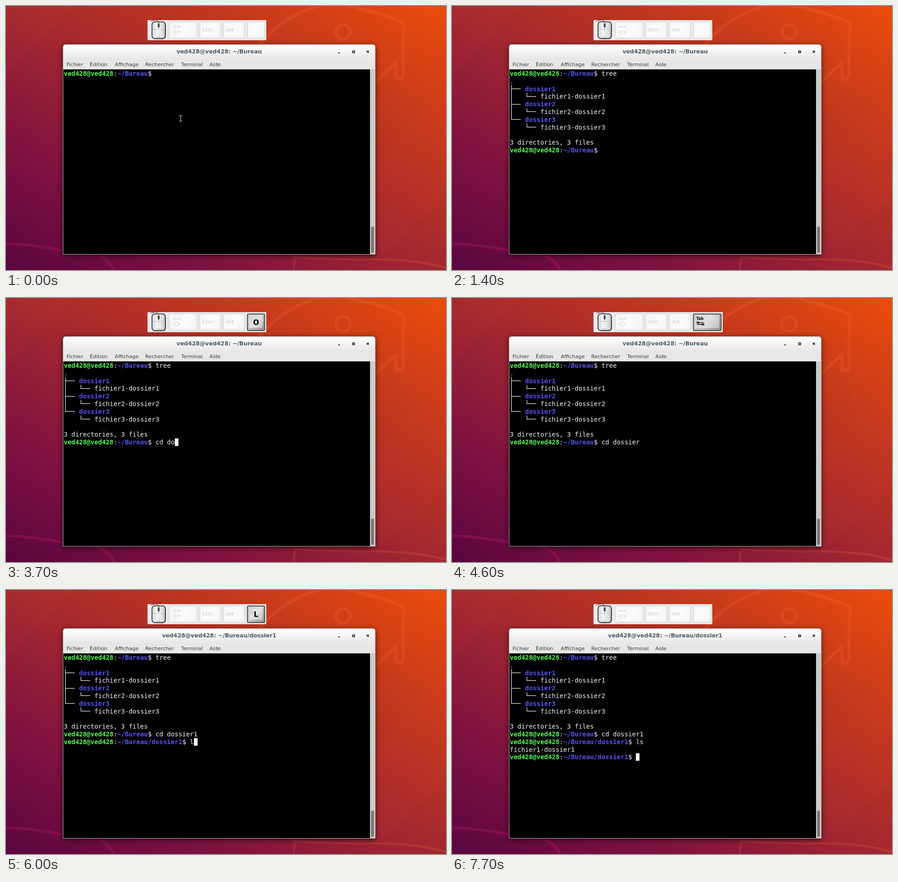
These frames come from a looping animation (967x579 px, 8 s). An HTML page with a canvas:

```html
<!DOCTYPE html>
<html lang="fr">
<head>
<meta charset="utf-8">
<title>Terminal</title>
<style>
html, body { margin: 0; width: 100%; height: 100%; overflow: hidden; background: #a4282f; }
canvas { display: block; }
</style>
</head>
<body>
<canvas id="stage" width="967" height="579"></canvas>
<script>
const ctx = document.getElementById('stage').getContext('2d');
const LOOP = 8000;
const SANS = '"DejaVu Sans", sans-serif';
const MONO = '13.95px "DejaVu Sans Mono", monospace';
const CELL = 8.4, ROW = 16.8, LEFT = 127, TOP = 140;
const WHITE = '#f6f6f6', GREEN = '#55fb55', BLUE = '#5454f2';
const USER = 'ved428@ved428';
const HOME = '~/Bureau', SUB = HOME + '/dossier1';
const DIRS = [HOME, HOME, SUB, SUB];
const DONE = ['tree', 'cd dossier1', 'ls'];

// start time, finished commands, typed text, caret visible, key shown
const STEPS = [
  [0, 0, '', 0, ''], [200, 0, 't', 1, 'T'], [300, 0, 'tr', 1, 'R'], [400, 0, 'tree', 1, 'E'],
  [800, 1, '', 1, 'E'], [900, 1, '', 1, 'Enter'], [1400, 1, '', 0, ''], [2000, 1, '', 1, ''],
  [2200, 1, 'c', 1, 'C'], [2300, 1, 'cd', 1, 'D'], [3100, 1, 'cd ', 1, 'Space'],
  [3300, 1, 'cd ', 0, ''], [3500, 1, 'cd d', 1, ''], [3600, 1, 'cd d', 1, 'D'],
  [3700, 1, 'cd do', 1, 'O'], [4000, 1, 'cd dossier', 1, 'O'], [4100, 1, 'cd dossier', 1, 'Tab'],
  [4600, 1, 'cd dossier', 0, 'Tab'], [4700, 1, 'cd dossier', 0, ''], [4800, 1, 'cd dossier1', 1, '1'],
  [5100, 2, '', 1, 'Enter'], [5600, 2, '', 1, ''], [5700, 2, '', 0, ''],
  [6000, 2, 'l', 1, 'L'], [6200, 2, 'ls', 1, 'S'], [6500, 3, '', 1, 'Enter'],
  [7100, 3, '', 0, ''], [7700, 3, '', 1, '']
];

function rect(x, y, w, h, fill) {
  ctx.fillStyle = fill;
  ctx.fillRect(x, y, w, h);
}

function box(x, y, w, h, r, fill, stroke, width = 1) {
  ctx.beginPath();
  ctx.roundRect(x, y, w, h, r);
  if (fill) { ctx.fillStyle = fill; ctx.fill(); }
  if (stroke) { ctx.strokeStyle = stroke; ctx.lineWidth = width; ctx.stroke(); }
}

function path(d, stroke, width) {
  ctx.strokeStyle = stroke;
  ctx.lineWidth = width;
  ctx.stroke(new Path2D(d));
}

function label(text, x, y, font, fill, align = 'left') {
  ctx.font = font;
  ctx.fillStyle = fill;
  ctx.textAlign = align;
  ctx.fillText(text, x, y);
}

function gradient(x0, y0, x1, y1, ...colors) {
  const g = ctx.createLinearGradient(x0, y0, x1, y1);
  colors.forEach((c, i) => g.addColorStop(i / (colors.length - 1), c));
  return g;
}

function wallpaper() {
  rect(0, 0, 967, 579, gradient(228.3, 715.7, 738.7, -136.7,
    '#5a0540', '#801240', '#a4282f', '#c5391c', '#ea4c0a'));
  ctx.fillStyle = 'rgba(255,90,60,0.035)';
  ctx.fill(new Path2D('M0 0H150L0 150Z'));
  ctx.fill(new Path2D('M967 180V420L812 560V330Z'));
  const faint = 'rgba(255,125,70,0.16)';
  path('M556 84C590 45 640 5 715 -6M740 -4C790 10 840 18 876 39C870 80 874 120 873 156L858 160L856 125L812 166', faint, 7);
  ctx.beginPath();
  ctx.arc(741, 57, 16, 0, Math.PI * 2);
  ctx.stroke();
  path('M790 0C860 30 903 85 903 145C903 205 870 260 812 306M812 150L902 110M812 80L900 170M835 84L890 220', 'rgba(255,125,70,0.13)', 1);
  path('M0 521C45 523 90 529 126 536M190 543Q225 552 237 579', 'rgba(200,20,110,0.3)', 6);
  path('M632 579L635 552L770 556Q890 552 967 574', faint, 5);
}

function frame(title) {
  ctx.save();
  ctx.shadowColor = 'rgba(0,0,0,0.6)';
  ctx.shadowBlur = 14;
  ctx.shadowOffsetY = 3;
  box(125, 84, 687, 461, [6, 6, 0, 0], '#b5b5b2');
  ctx.restore();
  box(126, 85, 685, 54, [5, 5, 0, 0], gradient(0, 85, 0, 117, '#ffffff', '#f2f2f1', '#e7e7e5'));
  label(title, 468.5, 104, 'bold 12.3px ' + SANS, '#4b5d65', 'center');
  rect(730, 102, 4, 2, '#30383c');
  box(762, 98.5, 4, 4, 0, null, '#30383c', 2);
  path('M793 98L797.5 102.5M797.5 98L793 102.5', '#30383c', 1.8);
  const menu = [['Fichier', 133], ['Édition', 184], ['Affichage', 239],
    ['Rechercher', 306], ['Terminal', 385], ['Aide', 447]];
  for (const [text, x] of menu) label(text, x, 131.5, '11.2px ' + SANS, '#3a3a3a');
  rect(126, 139, 674, 405, '#000');
  rect(800, 139, 11, 405, '#cbcbc9');
  box(803, 484, 5, 57, 2.5, '#777775', '#696967', 0.8);
}

function write(row, col, text, color, bold) {
  label(text, LEFT + col * CELL, TOP + row * ROW + 13, (bold ? 'bold ' : '') + MONO, color);
}

function prompt(row, dir, command) {
  const end = USER.length + 1 + dir.length;
  write(row, 0, USER, GREEN, true);
  write(row, USER.length, ':', WHITE);
  write(row, USER.length + 1, dir, BLUE, true);
  write(row, end, '$ ' + command, WHITE);
  return end + 2 + command.length;
}

// branch from a cell: stem down to `last` row, one arm per entry
function arm(row, col) {
  rect(Math.round(LEFT + (col + 0.5) * CELL) - 1, Math.round(TOP + (row + 0.5) * ROW) - 1, 2.5 * CELL, 1.2, WHITE);
}

function stem(row, last, col) {
  const y = TOP + row * ROW;
  rect(Math.round(LEFT + (col + 0.5) * CELL) - 1, y, 1.2, (last - row + 0.5) * ROW, WHITE);
}

function tree(row) {
  write(row, 0, '.', BLUE, true);
  stem(row + 1, row + 5, 0);
  for (let i = 1; i <= 3; i++) {
    const r = row + i * 2 - 1;
    arm(r, 0);
    write(r, 4, 'dossier' + i, BLUE, true);
    stem(r + 1, r + 1, 4);
    arm(r + 1, 4);
    write(r + 1, 8, `fichier${i}-dossier${i}`, WHITE);
  }
  write(row + 8, 0, '3 directories, 3 files', WHITE);
  return 9;
}

function shell(done, typed, caret) {
  let row = 0;
  for (let i = 0; i < done; i++) {
    prompt(row++, DIRS[i], DONE[i]);
    if (i === 0) row += tree(row);
    if (i === 2) write(row++, 0, 'fichier1-dossier1', WHITE);
  }
  const col = prompt(row, DIRS[done], typed);
  if (caret) rect(Math.round(LEFT + col * CELL), Math.round(TOP + row * ROW), 8, 16.5, '#fff');
}

function idleKey(x, w) {
  box(x + 0.5, 34.5, w - 1, 37, 2, '#f0f0f0', '#d0d0d0');
  box(x + 3, 36, w - 7, 31, 2, gradient(x, 36, x + w, 67, '#f6f6f6', '#fbfbfb', '#f4f4f4'));
}

function activeKey(name) {
  const long = name.length > 1, w = long ? 62 : 39;
  box(530.5, 35, w - 1, 36.5, 2.5, gradient(530, 35, 530 + w, 71, '#c9c9c9', '#bdbdbd', '#8c8c8c'), '#262626', 1.5);
  box(534, 37, w - 9, 29, 2, gradient(534, 37, 525 + w, 66, '#d0d0d0', '#e2e2e2', '#c2c2c2'));
  if (!long) return label(name, 549.5, 58.5, 'bold 15.5px ' + SANS, '#000', 'center');
  label(name, 537, 48, 'bold 8.2px ' + SANS, '#000');
  if (name === 'Enter') path('M553 51V56.5H539M542 53.5L538.5 56.5L542 59.5', '#111', 1.2);
  if (name === 'Tab') {
    path('M538.5 51V57M539 54H553M543 51.5L539.5 54L543 56.5M553.5 55V61M539 58H553M549 55.5L552.5 58L549 60.5', '#111', 1.3);
  }
}

function keyPanel(key) {
  rect(311, 31, key.length > 1 ? 284 : 261, 44, '#ebebeb');
  path('M317 34Q325 30 331 31.5Q335 32.5 335.5 37', '#7a5558', 1.2);
  box(322, 36.5, 30, 37, 7, 'rgba(0,0,0,0.25)');
  box(320.8, 34.8, 29.4, 36.5, 6, gradient(321, 0, 350, 0, '#cfd3d4', '#f2f4f4', '#e6e9ea', '#c3c8c9'), '#161616', 1.5);
  path('M322 51.5H349M335.5 36V51', '#b4babb', 0.9);
  box(334, 38, 3, 9, 1.5, '#4d5152', '#222', 0.8);
  rect(331, 67, 9, 1.5, '#b3babc');
  idleKey(358, 63);
  idleKey(425, 48);
  idleKey(477, 48);
  const pale = '#d9d9d9';
  label('Shift', 366.5, 48, 'bold 6.6px ' + SANS, pale);
  path('M375 52.5L383 57.5H379V61.5H371V57.5H367Z', pale, 1.2);
  label('Ctrl', 431, 56, 'bold 11px ' + SANS, pale);
  label('Alt', 483.5, 56, 'bold 11px ' + SANS, pale);
  if (key) activeKey(key);
  else idleKey(530, 40);
}

function pointer() {
  path('M381 240.5H383L384 241.5L385 240.5H387M384 241V252M381 252.5H383L384 251.5L385 252.5H387', '#d8d8d8', 1.2);
}

let shown = -1;
function tick(now) {
  const t = now % LOOP;
  const index = STEPS.findLastIndex(s => s[0] <= t);
  if (index !== shown) {
    shown = index;
    const [, done, typed, caret, key] = STEPS[index];
    wallpaper();
    frame(USER + ': ' + DIRS[done]);
    shell(done, typed, caret);
    keyPanel(key);
    if (index === 0) pointer();
  }
  requestAnimationFrame(draw);
}

const start = performance.now();
function draw() {
  tick(performance.now() - start);
}
draw();
</script>
</body>
</html>
```
